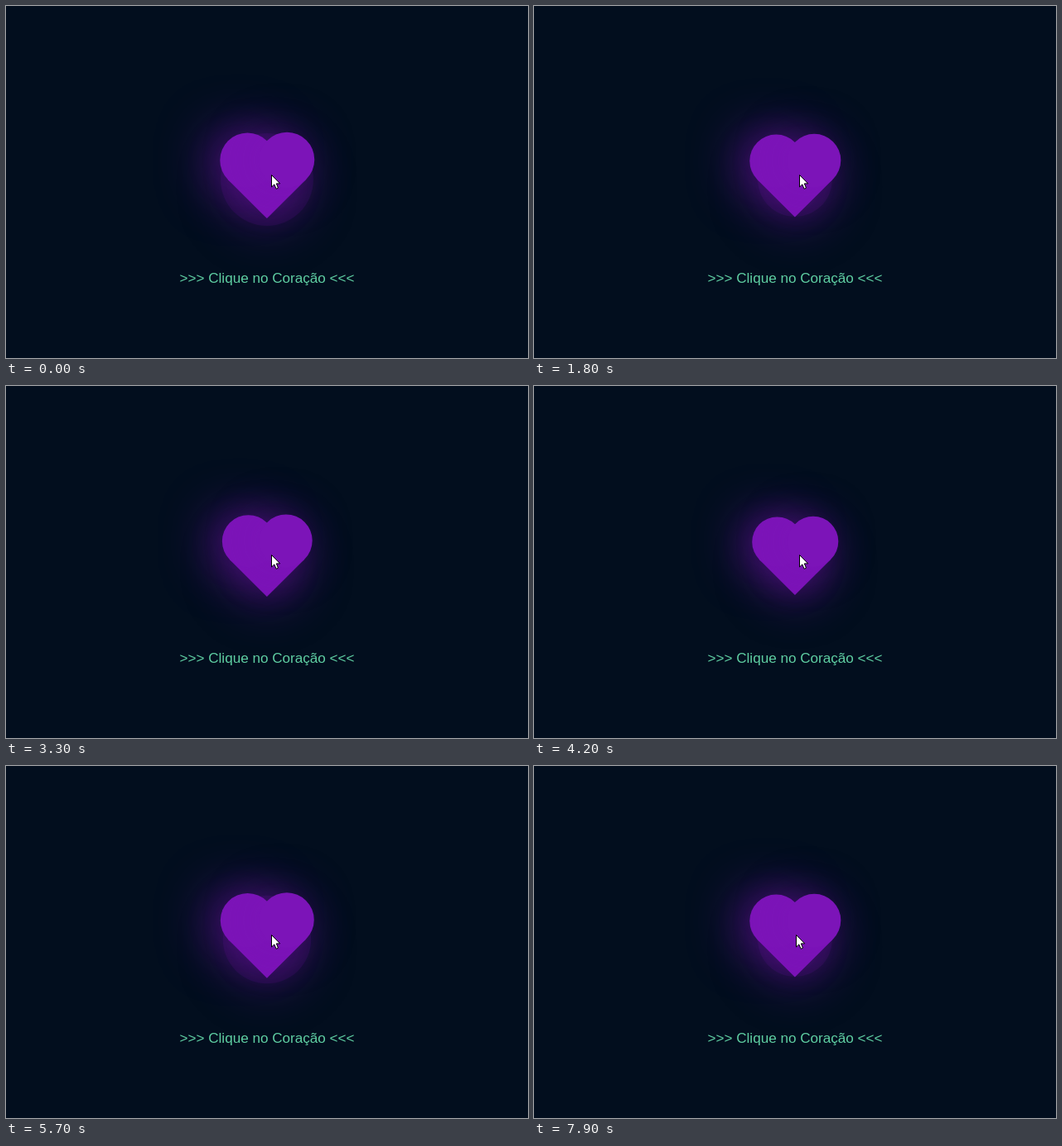
Write an HTML page that moves like this. It is 630x426 px and loops after 8000 ms.

```html
<!DOCTYPE html>
<html lang="pt">
<head>
<meta charset="utf-8">
<style>
  html, body { margin: 0; width: 100%; height: 100%; overflow: hidden; background: #020e1e; }
  #heart, #heart::before, #heart::after {
    position: absolute; width: 62.4px; height: 62.4px; background: #7c14b8;
  }
  #heart { left: 283.8px; top: 178.8px; box-shadow: -6px 6px 58px #7c14b8a8; }
  #heart::before, #heart::after { content: ""; border-radius: 50%; }
  #heart::before { top: -50%; left: 0; box-shadow: -7px -7px 60px #7c14b8c0; }
  #heart::after { top: 0; left: 50%; box-shadow: -6px -6px 56px #7c14b870; }
  svg { position: absolute; left: 0; top: 0; }
  text { font: 17.1px "Liberation Sans", Arial, sans-serif; fill: #5fcfa3; }
</style>
</head>
<body>
<svg width="630" height="426">
  <circle id="halo" cx="315" cy="210" fill="#7c14b8"/>
</svg>
<div id="heart"></div>
<svg width="630" height="426">
  <defs>
    <radialGradient id="red">
      <stop offset="0" stop-color="#c98bd0"/>
      <stop offset=".55" stop-color="#c05aa6"/>
      <stop offset="1" stop-color="#c41f68"/>
    </radialGradient>
  </defs>
  <text x="315" y="334.5" text-anchor="middle">&gt;&gt;&gt; Clique no Coração &lt;&lt;&lt;</text>
  <circle id="click" cx="320.5" cy="204" r="19.5" fill="url(#red)"/>
  <path id="cursor" d="M0 0V14.5L3.3 11.4L5.6 16.8L8 15.7L5.8 10.4H10.2Z" fill="#fff" stroke="#000"/>
</svg>
<script>
  const el = id => document.getElementById(id);
  const [heart, halo, click, cursor] = ["heart", "halo", "click", "cursor"].map(el);

  // [time in ms, value]
  const beats = [[0, 0], [600, .88], [1400, .88], [1500, 1], [1800, 1.427], [2500, 2.427],
    [4200, 4.823], [5700, 7.107], [6800, 8.862], [7900, 10.427]];
  const cursorX = [[0, 320.5], [6000, 320.5], [6800, 318.8], [7900, 316.5]];

  function at(keys, t) {
    const i = Math.max(1, keys.findIndex(k => k[0] >= t));
    const [t0, v0] = keys[i - 1], [t1, v1] = keys[i];
    return v0 + (v1 - v0) * (t - t0) / (t1 - t0);
  }

  // Slow shrink for 80% of the beat, then a quick contraction
  const pulse = p => p < .8 ? 1.07 - .07 * p / .8 : 1 - (p - .8);

  function draw(now) {
    const t = Math.floor(now % 8000 / 100) * 100;
    const p = at(beats, t) % 1;
    heart.style.transform = `rotate(-45deg) scale(${pulse(p)})`;
    halo.setAttribute("r", 56 - 26 * p);
    halo.setAttribute("opacity", p < .5 ? .13 : 0);
    click.setAttribute("opacity", t >= 2400 && t < 2700 ? 1 : 0);
    cursor.setAttribute("transform", `translate(${at(cursorX, t)} 204.5)`);
    requestAnimationFrame(draw);
  }
  draw(0);
</script>
</body>
</html>
```
